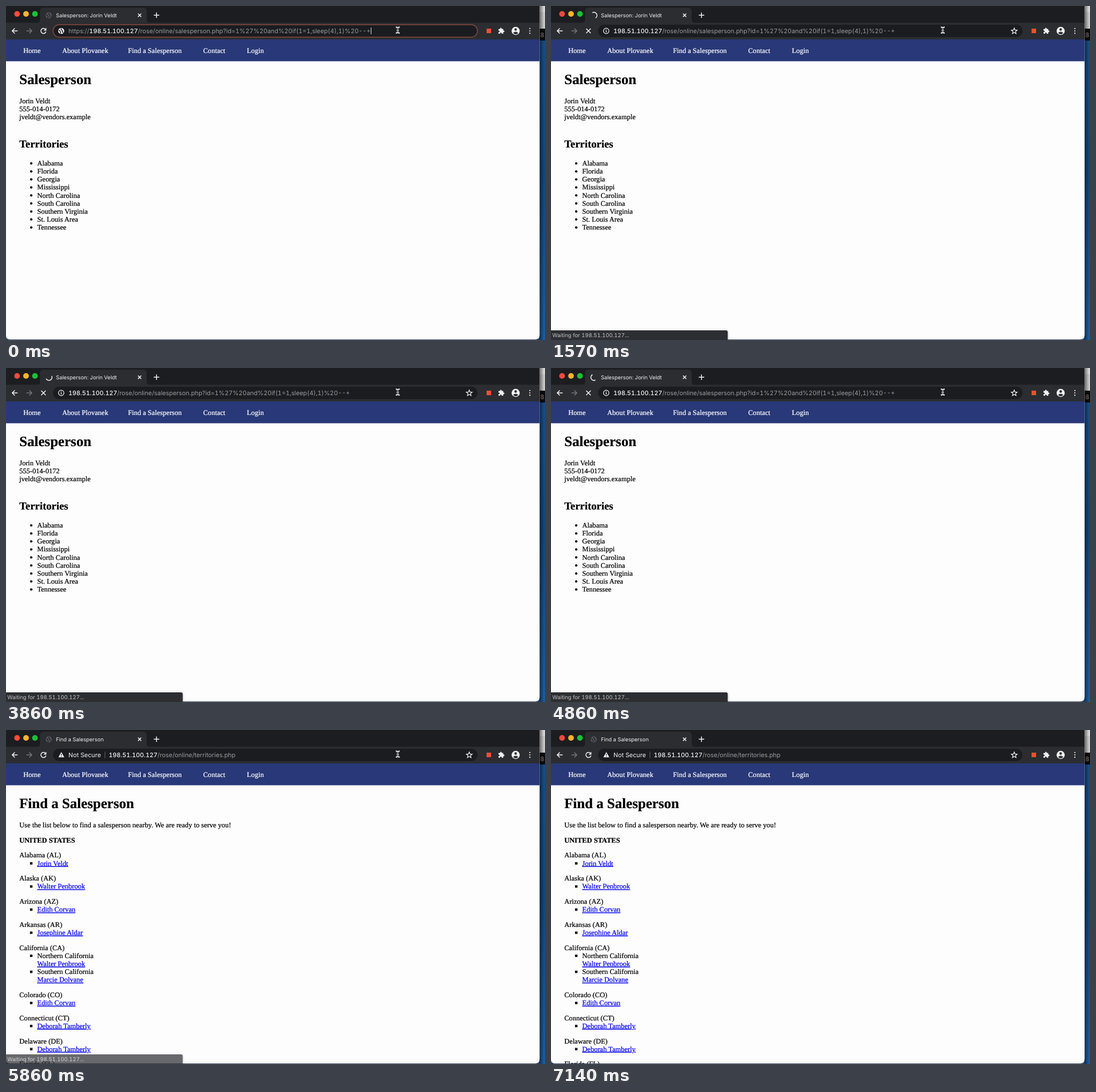
Animation of 950 by 590 pixels, one loop 7280 ms. Source, as an HTML page:

```html
<!DOCTYPE html>
<html lang="en">
<head>
<meta charset="utf-8">
<title>Slow page load</title>
<style>
  html, body { margin: 0; width: 100%; height: 100%; overflow: hidden; background: #16508c; }
  svg { display: block; }
  text { text-rendering: geometricPrecision; white-space: pre; }
  .ui { font: 10.85px Inter, Roboto, sans-serif; font-variant-numeric: tabular-nums; fill: #9a9ca0; }
  .ui .lit { fill: #f1f2f3; font-weight: 500; }
  .page { font: 12.56px "Liberation Serif", Times, serif; fill: #000; stroke: #000; stroke-width: .22; }
  .page .h1 { font-size: 25.1px; font-weight: bold; }
  .page .h2 { font-size: 18.84px; font-weight: bold; }
  .page .link { fill: #0000ee; stroke: #0000ee; text-decoration: underline; }
  #nav { fill: #fff; stroke: #fff; }
  .line { fill: none; stroke: #f1f2f3; stroke-width: 1.5; }
</style>
</head>
<body>
<svg width="950" height="590" viewBox="0 0 950 590">
  <defs>
    <linearGradient id="desk" x2="0" y2="1">
      <stop offset="0" stop-color="#174f8a"/><stop offset=".5" stop-color="#12457c"/><stop offset="1" stop-color="#1c5c9d"/>
    </linearGradient>
    <linearGradient id="shade">
      <stop offset="0" stop-opacity=".5"/><stop offset="1" stop-opacity="0"/>
    </linearGradient>
    <clipPath id="win"><path d="M0 0H940.5V581Q940.5 589 932.5 589H7Q0 589 0 582Z"/></clipPath>
    <filter id="soft" x="-10%" y="-60%" width="120%" height="220%"><feGaussianBlur stdDeviation="2.5"/></filter>
    <g id="globe">
      <circle r="5.3"/>
      <path d="M-4.3-1.2Q-2-.6-1.6 1T-1 4.6M.2-4.4Q-.6-2 1-1.6T2 .8 3.8 2.4" fill="none" stroke="#202226" stroke-width="1.5"/>
    </g>
  </defs>

  <!-- desktop behind the window -->
  <rect width="950" height="590" fill="url(#desk)"/>
  <rect x="940" width="10" height="40" fill="#d8d6d7"/>
  <rect x="940" y="11" width="10" height="29" fill="#c9c7c8"/>
  <rect x="940" y="40" width="10" height="21" fill="#0b0b0c"/>
  <text x="941.5" y="55" class="ui" style="fill:#a58e84">8</text>
  <rect x="940" width="8" height="590" fill="url(#shade)"/>
  <rect y="588" width="940" height="2" fill="#35465c"/>

  <g clip-path="url(#win)">
    <rect width="941" height="590" fill="#fefdfe"/>
    <rect width="941" height="30" fill="#1b1d20"/>
    <rect y="29.5" width="941" height="29.5" fill="#2b2d31"/>
    <rect y="59" width="941" height="38.6" fill="#283878"/>
    <g class="page" id="nav"></g>
    <g class="page" id="before"></g>
    <g class="page" id="after"></g>
  </g>

  <!-- tab strip -->
  <circle cx="19.5" cy="14" r="5" fill="#fd4a41"/>
  <circle cx="35.3" cy="14" r="5" fill="#fdb229"/>
  <circle cx="51" cy="14" r="5" fill="#1bc136"/>
  <path d="M54 30Q60 30 60 24V9Q60 3 66 3H242Q248 3 248 9V24Q248 30 254 30Z" fill="#2b2d31"/>
  <path class="line" d="M232.7 13.5l5.6 5.6m0-5.6l-5.6 5.6M260.5 16.3h9.6m-4.8-4.8v9.6"/>
  <use href="#globe" id="favicon" x="75.3" y="16.4" fill="#55585d"/>
  <path class="line" id="spinner"/>
  <text class="ui" x="88" y="19.7" style="font-size:9.4px"><tspan class="lit" id="title" style="font-weight:400"></tspan></text>

  <!-- toolbar -->
  <path class="line" d="M20.5 44H11m4.5-4.5L11 44l4.5 4.5"/>
  <path class="line" d="M36 44h9.5M41 39.5l4.5 4.5-4.5 4.5" style="stroke:#74767a"/>
  <g id="reload">
    <path class="line" d="M69.6 41A4.6 4.6 0 1 0 70.5 45.3"/>
    <path d="M71.2 38.6v4.9h-4.9Z" fill="#f1f2f3"/>
  </g>
  <path class="line" id="stop" d="M62 40l8 8m0-8l-8 8"/>
  <rect id="box" x="83" y="33" width="748" height="22" rx="11" fill="#1b1c20" stroke-width="1.4"/>
  <g id="focused">
    <use href="#globe" x="97.3" y="44" fill="#f1f2f3"/>
    <text class="ui url" x="110" y="48"></text>
    <path id="caret" stroke="#dfe0e2"/>
  </g>
  <g id="waiting">
    <circle class="line" cx="97.3" cy="44" r="4.8" style="stroke-width:1.2"/>
    <path class="line" d="M97.3 43.3v3.4m0-5.6v1.3" style="stroke-width:1.3"/>
    <text class="ui url" x="110" y="48"></text>
  </g>
  <g id="arrived">
    <path d="M97.5 39l5.2 9.2H92.3Z" fill="#f1f2f3"/>
    <path d="M97.5 42v3m0 1v1.2" stroke="#1b1c20" stroke-width="1.1"/>
    <text class="ui" x="110" y="48"><tspan class="lit" style="font-weight:400">Not Secure</tspan></text>
    <path d="M174.5 38v12" stroke="#5c5f63"/>
    <text class="ui url" x="181" y="48"></text>
  </g>
  <path class="line" id="star" style="stroke-width:1.2"/>
  <rect x="847" y="40" width="8" height="8" fill="#ee4f30"/>
  <path transform="translate(867 38) scale(.5)" fill="#f1f2f3" d="M20.5 11H19V7c0-1-1-2-2-2h-4V3.5a2.5 2.5 0 0 0-5 0V5H4c-1 0-2 1-2 2v3.8h1.5a2.7 2.7 0 0 1 0 5.4H2V20c0 1 1 2 2 2h3.8v-1.5a2.7 2.7 0 0 1 5.4 0V22H17c1 0 2-1 2-2v-4h1.5a2.5 2.5 0 0 0 0-5z"/>
  <circle cx="898.3" cy="44" r="7.2" fill="#f1f2f3"/>
  <circle cx="898.3" cy="41.5" r="2.2" fill="#2b2d31"/>
  <path d="M893.8 47.4q4.5-4 9 0q-4.5 5-9 0Z" fill="#2b2d31"/>
  <path d="M923.3 39.8v0m0 4.2v0m0 4.2v0" stroke="#f1f2f3" stroke-width="2.2" stroke-linecap="round"/>

  <g id="status">
    <rect x="-6" y="574" width="317" height="22" rx="3" opacity=".3" filter="url(#soft)"/>
    <path d="M0 573H308.5Q311.5 573 311.5 576V590H0Z" fill="#2d2e32"/>
    <text class="ui" x="2.3" y="584.5" style="font-size:9.6px;fill:#c4c5c8">Waiting for 198.51.100.127...</text>
  </g>

  <!-- text pointer -->
  <g id="pointer" fill="none">
    <path d="M687 37.3q3.5 0 3.5 2v6.4q0 2-3.5 2m7-10.4q-3.5 0-3.5 2m0 6.4q0 2 3.5 2m-5.3-4.6h3.6" stroke="#d6d7d9" stroke-width="2.2"/>
    <path d="M690.5 39v7" stroke="#333" stroke-width=".8"/>
  </g>
</svg>

<script>
const $ = id => document.getElementById(id);
const LINE = 14.13, LEFT = 23.5, INDENT = 55;
const HOST = "198.51.100.127", ROOT = "/rose/online/";
const QUERY = "salesperson.php?id=1%27%20and%20if(1=1,sleep(4),1)%20--+";
const REP = "Jorin Veldt";

const text = (x, y, s, cls = "") => `<text x="${x}" y="${y}" class="${cls}">${s}</text>`;
const dot = y => `<circle cx="44.5" cy="${y - 3.9}" r="2"/>`;
const square = y => `<rect x="42.5" y="${y - 5.9}" width="4" height="4"/>`;

$("nav").innerHTML = [[30.5, "Home"], [99, "About Plovanek"], [215, "Find a Salesperson"],
  [347.5, "Contact"], [424.5, "Login"]].map(([x, s]) => text(x, 83.3, s)).join("");

const areas = ["Alabama", "Florida", "Georgia", "Mississippi", "North Carolina", "South Carolina",
  "Southern Virginia", "St. Louis Area", "Tennessee"];
$("before").innerHTML = text(LEFT, 137.5, "Salesperson", "h1") +
  [REP, "555-014-0172", "jveldt@vendors.example"].map((s, i) => text(LEFT, 172 + i * LINE, s)).join("") +
  text(LEFT, 250.2, "Territories", "h2") +
  areas.map((s, i) => dot(282 + i * LINE) + text(INDENT, 282 + i * LINE, s)).join("");

const W = "Walter Penbrook", E = "Edith Corvan", D = "Deborah Tamberly";
const states = [["Alabama (AL)", REP], ["Alaska (AK)", W], ["Arizona (AZ)", E], ["Arkansas (AR)", "Josephine Aldar"],
  ["California (CA)", W, "Northern California", "Marcie Dolvane", "Southern California"],
  ["Colorado (CO)", E], ["Connecticut (CT)", D], ["Delaware (DE)", D], ["Florida (FL)"]];
let y = 225.4, list = "";
for (const [state, ...people] of states) {
  list += text(LEFT, y, state);
  for (let i = 0; i < people.length; i += 2) {
    y += LINE;
    list += square(y);
    if (people[i + 1]) {
      list += text(INDENT, y, people[i + 1]);
      y += LINE;
    }
    list += text(INDENT, y, people[i], "link");
  }
  y += LINE + 12.56;
}
$("after").innerHTML = text(LEFT, 137.5, "Find a Salesperson", "h1") +
  text(LEFT, 172, "Use the list below to find a salesperson nearby. We are ready to serve you!") +
  `<g font-weight="bold">${text(LEFT, 198.7, "UNITED STATES")}</g>` + list;

const setUrl = (id, scheme, path) => {
  const el = document.querySelector(`#${id} .url`);
  el.innerHTML = `${scheme}<tspan class="lit">${HOST}</tspan>${ROOT}${path}`;
  return el;
};
const typed = setUrl("focused", "https://", QUERY);
setUrl("waiting", "", QUERY);
setUrl("arrived", "", "territories.php");
$("caret").setAttribute("d", `M${110.8 + typed.getComputedTextLength()} 38v12`);

$("star").setAttribute("d", "M" + Array.from({ length: 10 }, (_, i) => {
  const r = i % 2 ? 2.4 : 5.4, a = i * Math.PI / 5;
  return `${816.5 + r * Math.sin(a)} ${44.3 - r * Math.cos(a)}`;
}).join("L") + "Z");

// Arc around the tab icon; degrees run clockwise from the right.
function arc(from, to) {
  const at = deg => {
    const a = deg * Math.PI / 180;
    return `${75.7 + 5.4 * Math.cos(a)} ${16.5 + 5.4 * Math.sin(a)}`;
  };
  return `M${at(from)}A5.4 5.4 0 ${to - from > 180 ? 1 : 0} 1 ${at(to)}`;
}

const LOOP = 7280, STEP = 1000 / 7;
const SEND = STEP, COMMIT = 37 * STEP, DONE = 40 * STEP, LEAVE = 47 * STEP;

function spinner(t) {
  if (t < COMMIT - 1) {
    // waiting: head turns counter-clockwise, tail follows half a turn behind
    const turn = 360 * (t - SEND) / 1320 + 3;
    return arc(270 - turn, 270 - Math.max(0, turn - 180));
  }
  // loading: clockwise, tail catching up with the head
  const p = Math.min(1, (t - COMMIT) / 666), head = 270 + 360 * (t - COMMIT) / 1568;
  return arc(head - 270 * (1 - p * p * (3 - 2 * p)), head);
}

const show = (id, on) => $(id).style.display = on ? "" : "none";

function draw(now) {
  const t = Math.floor((now % LOOP + 5) / STEP + 1e-6) * STEP;
  const sent = t > SEND - 1, committed = t > COMMIT - 1, done = t > DONE - 1;
  const busy = sent && !done;
  show("focused", !sent);
  show("waiting", sent && !committed);
  show("arrived", committed);
  show("star", sent);
  show("before", !done);
  show("after", done);
  show("reload", !busy);
  show("stop", busy);
  show("favicon", !busy);
  show("spinner", busy);
  if (busy) $("spinner").setAttribute("d", spinner(t));
  $("box").setAttribute("stroke", sent ? "none" : "#87493f");
  $("title").textContent = committed ? "Find a Salesperson" : "Salesperson: " + REP;
  $("status").style.opacity = t < 2 * STEP - 1 ? 0 : Math.max(0, Math.min(1, 1 - (t - 5800) / 200));
  // the pointer slips out over the top edge
  $("pointer").setAttribute("transform", `translate(0 ${-18 * Math.max(0, t - LEAVE) / STEP})`);
  requestAnimationFrame(frame);
}

let start;
function frame(now) {
  start ??= now;
  draw(now - start);
}
draw(0);
</script>
</body>
</html>
```
